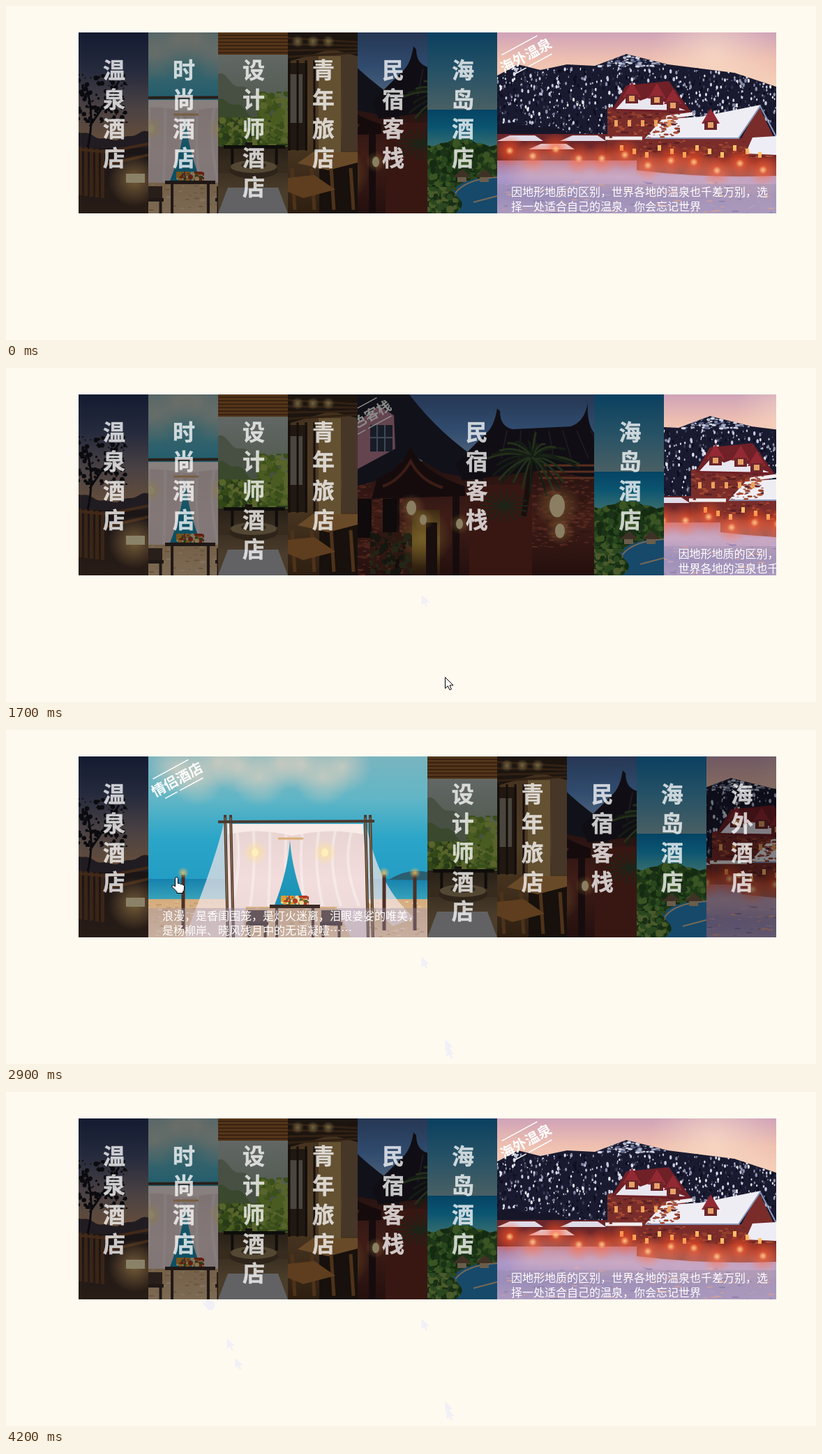
Write an HTML page with a canvas that moves like this. It is 1161 px wide and 480 px high and loops after 4700 ms.

```html
<!DOCTYPE html>
<html lang="zh-CN">
<head>
<meta charset="utf-8">
<title>Hotel accordion</title>
<style>
html, body { margin: 0; width: 100%; height: 100%; overflow: hidden; background: #fffaf0; }
body { font: 16px/21px "Noto Sans CJK SC", "Noto Sans CJK", sans-serif; color: #fff; text-spacing-trim: space-all; }
svg { position: absolute; left: 0; top: 0; width: 1161px; height: 480px; }
#menu { position: absolute; left: 104px; top: 38px; width: 1000px; height: 260px; display: flex; overflow: hidden; }
.panel { position: relative; flex: none; height: 260px; overflow: hidden; }
.panel > * { position: absolute; }
canvas { left: calc(50% - 200px); top: 0; }
.shade { inset: 0; background: rgba(0,0,0,.46); }
.shade b { position: absolute; left: calc(50% - 15px); top: 31px; width: 32px; font-size: 32px; line-height: 42px; color: rgba(255,255,255,.76); -webkit-text-stroke: .5px rgba(255,255,255,.6); }
.note { left: 0; top: 218px; height: 42px; width: 95%; padding-left: 20px; background: rgba(150,140,165,.38); }
.open .shade, .panel:not(.open) .note { display: none; }
</style>
</head>
<body>
<svg id="stains" fill="#f1f0f7"></svg>
<div id="menu"></div>
<svg><path id="cursor" fill="#fff" stroke="#000"/></svg>
<script>
let c, seed = 7;
const rnd = () => (seed = seed * 16807 % 2147483647) / 2147483647;
const repeat = (n, draw) => { for (let i = 0; i < n; i++) draw(i); };

// Drawing helpers, all on a 400 x 260 picture
const fade = (y0, y1, ...colors) => {
  const g = c.createLinearGradient(0, y0, 0, y1);
  colors.forEach((col, i) => g.addColorStop(i / (colors.length - 1), col));
  return g;
};
const rect = (fill, x, y, w, h) => { c.fillStyle = fill; c.fillRect(x, y, w, h); };
const shape = (fill, d) => { c.fillStyle = fill; c.fill(new Path2D(d)); };
const line = (color, width, d) => { c.strokeStyle = color; c.lineWidth = width; c.stroke(new Path2D(d)); };
const oval = (fill, x, y, rx, ry) => { c.fillStyle = fill; c.beginPath(); c.ellipse(x, y, rx, ry, 0, 0, 7); c.fill(); };
const glow = (rgb, x, y, r, alpha = .8) => {
  const g = c.createRadialGradient(x, y, 0, x, y, r);
  g.addColorStop(0, `rgba(${rgb},${alpha})`);
  g.addColorStop(1, `rgba(${rgb},0)`);
  rect(g, x - r, y - r, 2 * r, 2 * r);
};
// Outline of a hill range made of two waves
const range = (y, height, wave, shift = 0) => {
  let d = 'M0 260';
  for (let x = 0; x <= 400; x += 5)
    d += `L${x} ${y - height * (Math.sin(x / wave + shift) + .25 * Math.sin(x / wave * 4.3))}`;
  return d + 'V260Z';
};
const boxPath = (x, y, w, h) => `M${x} ${y}h${w}v${h}h${-w}Z`;
const texture = (n, size, colors, [x, y, w, h], clip = boxPath(x, y, w, h), flat = 1) => {
  c.save();
  c.clip(new Path2D(clip));
  repeat(n, i => {
    const s = size * (.4 + rnd());
    oval(colors[i % colors.length], x + rnd() * w, y + rnd() * h, s, s * flat);
  });
  c.restore();
};
const table = (color, x, y, w, h) => {
  rect(color, x, y, w, 5);
  line(color, 4, `M${x + w * .14} ${y}v${h}M${x + w * .86} ${y}v${h}`);
};
const stamp = text => {
  c.save();
  c.translate(41, 33);
  c.rotate(-.5);
  c.fillStyle = '#fff';
  c.font = '900 20px "Noto Sans CJK SC", "Noto Sans CJK", sans-serif';
  c.textAlign = 'center';
  c.textBaseline = 'middle';
  c.fillText(text, 0, 0);
  line('#fff', 1.5, 'M-30-17H28M-28 16H-8M-4 16H34');
  c.restore();
};

function hotSpring() {
  rect(fade(0, 165, '#25325a', '#454e70', '#8b7a7c', '#c39368'), 150, 0, 100, 260);
  shape('#3c343c', range(148, 6, 18));
  rect(fade(165, 260, '#312529', '#4a3428'), 150, 166, 100, 94);
  line('#15141c', 3, 'M162 170Q175 120 160 75M166 135Q190 100 208 70');
  texture(110, 2.5, ['#15141c'], [150, 60, 70, 70]);
  repeat(5, i => rect('#6b4429', 150 + i * 8, 164 + i, 5, 70));
  line('#7a4c2c', 4, 'M150 168 190 172 250 160M190 190 250 176');
  glow('255,200,120', 230, 212, 38);
  rect('#fff0c0', 218, 203, 27, 13);
}

function beach() {
  rect(fade(0, 178, '#79b4bf', '#62b6c6', '#2aa5c8', '#249dc4'), 0, 0, 400, 178);
  repeat(9, i => glow('246,214,190', 40 + i * 30, 18 + 14 * Math.sin(i * 2), 40, .55));
  rect(fade(176, 208, '#1681ae', '#3aa6bb'), 0, 176, 400, 32);
  shape('#2b5f70', 'M345 177Q372 160 400 166V178Z');
  rect(fade(205, 260, '#d3ab7e', '#e6c49a'), 0, 205, 400, 55);
  texture(200, 3, ['#c59c70', '#f0d4ae'], [0, 208, 400, 52], undefined, .3);
  shape('rgba(247,231,232,.7)', 'M108 96Q96 150 52 260H118V96ZM312 96Q330 190 382 232L350 244 306 200Z');
  shape(fade(96, 260, '#e7d3d2', '#f2dddc', '#e8d6d4'), 'M114 98H308L318 260H290L270 216H140L134 260H112Z');
  repeat(8, i => line('rgba(255,255,255,.35)', 4, `M${126 + i * 24} 100Q${135 + i * 20} 150 ${120 + i * 26} 215`));
  shape('#f8ebe8', 'M114 97H308V112Q260 102 206 114Q160 102 114 112Z');
  shape(fade(120, 216, '#33a3c2', '#1590b5'), 'M203 120Q206 165 226 216H180Q200 165 203 120Z');
  line('#dcae76', 3, 'M186 118H222');
  [153, 253].forEach(x => {
    glow('255,226,150', x, 138, 18);
    oval('#fff0bc', x, 138, 5, 6);
  });
  [110, 118, 311, 318].forEach(x => {
    line('#4b3a30', 4, `M${x} 84 ${x + 4} 260`);
    line('#a98258', 1, `M${x} 88 ${x + 4} 260`);
  });
  line('#4b3a30', 4, 'M100 94 324 93');
  table('#3b2c28', 174, 213, 72, 47);
  [142, 248].forEach(x => { rect('#4a3830', x, 221, 28, 17); table('#3b2c28', x - 2, 238, 32, 22); });
  texture(50, 3, ['#b23b22', '#e29a30', '#4b6a2a', '#f0d8a0'], [190, 200, 40, 13]);
  [50, 338, 382].forEach(x => { line('#4c2f26', 5, `M${x} 170V250`); glow('255,190,90', x, 167, 8); });
  stamp('情侣酒店');
}

function designer() {
  rect(fade(32, 160, '#b4beba', '#9aaa98', '#7a9458'), 150, 0, 100, 260);
  shape('#84947c', range(80, 18, 25, 2));
  shape('#6b8452', range(112, 14, 20));
  texture(260, 4, ['#87a83c', '#5d832c', '#a2b850', '#4a6a2c'], [150, 122, 100, 42]);
  texture(160, 4, ['#87a83c', '#6c9132', '#a2b850'], [206, 85, 44, 75]);
  rect('#9a6230', 150, 0, 100, 32);
  repeat(6, i => rect('#6b3f1d', 150, 3 + i * 5, 100, 2));
  rect(fade(164, 230, '#4a3a2a', '#8a7050'), 150, 164, 100, 96);
  table('#1c1814', 158, 162, 88, 28);
  rect('#665038', 150, 190, 100, 12);
  oval('#54432f', 201, 198, 35, 12);
  oval('#9a8460', 201, 193, 33, 9);
  oval('#605035', 201, 191, 18, 5);
  rect('#2d241d', 189, 158, 10, 9);
  shape('#b4b5b8', 'M164 223H236L250 260H150Z');
}

function hostel() {
  rect(fade(0, 260, '#785636', '#937046', '#55381f'), 150, 0, 100, 260);
  rect('#3d2c20', 150, 44, 28, 125);
  rect('#b9965c', 194, 34, 32, 138);
  rect('#80644a', 228, 30, 22, 140);
  shape('#33251c', 'M150 0H250V34L212 24 150 42Z');
  repeat(4, i => line('#5b3d23', 3, `M150 ${8 + i * 9} 250 ${14 + i * 5}`));
  repeat(3, i => glow('255,220,140', 164 + i * 22, 13, 9));
  rect('#8a8070', 153, 60, 18, 70);
  repeat(4, i => line('#241a14', 3, `M${152 + i * 12} 40V170`));
  rect('#2b1e16', 195, 187, 55, 73);
  shape('#c18849', 'M164 188 186 172H250V187L208 198Z');
  repeat(4, i => line('#8d5d30', 5, `M${156 + i * 28} 195 ${160 + i * 28} 255`));
  shape('#ad7338', 'M150 209 188 205 218 226 172 238 150 229Z');
}

function inn() {
  rect(fade(0, 100, '#45659a', '#5a8bcb', '#9bc0e8'), 0, 0, 400, 260);
  rect(fade(92, 260, '#3c1d1d', '#74342a', '#421d1a'), 0, 96, 400, 164);
  [[0, 115, 100, 145], [280, 95, 120, 125]].forEach(box => texture(350, 4, ['#873e2f', '#592820', '#98493a'], box, undefined, .35));
  shape('#20202e', 'M0 0H104Q150 60 210 98V124L150 112 104 84 70 120 0 140Z');
  shape('#b77d91', 'M4 60 60 16 82 30 84 78 10 118Z');
  rect('#2d3348', 48, 44, 32, 38);
  line('#7585a1', 2, 'M58 44v38M69 44v38M48 62h32');
  shape('#1e1a24', 'M170 100 214 56Q226 46 230 20L234 24Q234 46 252 50L335 46Q355 40 360 12Q358 44 371 58L400 86V128L300 108 180 124Z');
  repeat(7, i => line('#3d3541', 1.5, `M${244 + i * 20} 52l${i * 5 - 8} 40`));
  shape('#271518', 'M58 120Q92 108 106 74Q122 112 184 132V146L50 150Z');
  line('#6e3426', 4, 'M66 132Q90 124 106 96Q120 124 152 134');
  [80, 166].forEach(x => rect('#2a1718', x, 146, 10, 114));
  repeat(3, i => line('#a55537', 3, `M290 ${102 + i * 9}H400`));
  [30, 66].forEach(x => rect('#1b1215', x, 150, 20, 56));
  rect(fade(165, 260, '#6e4c24', '#a27b30', '#4a2c1a'), 108, 166, 40, 94);
  glow('255,210,90', 124, 205, 42, .6);
  rect('#2c1a18', 128, 184, 16, 76);
  rect('#682a22', 190, 130, 90, 130);
  line('#281c1a', 8, 'M280 90Q276 125 268 175');
  repeat(26, i => {
    const a = i * 2.4, r = 40 + rnd() * 30, x = 280 + Math.cos(a) * r, y = 100 + Math.sin(a) * r * .7;
    line(i % 2 ? '#263525' : '#41582f', 3, `M280 90Q${(280 + x) / 2} ${(90 + y) / 2 - 12} ${x} ${y}`);
  });
  repeat(18, i => line('#35432b', 2, `M240 160l${Math.cos(i * .35) * 34} ${Math.sin(i * .35) * 24}`));
  texture(120, 4, ['#27291c', '#404527', '#522b20'], [48, 198, 60, 60]);
  [[107, 163, 7], [124, 180, 5], [176, 186, 5], [316, 160, 11], [320, 196, 7]].forEach(([x, y, r]) => {
    glow('255,190,100', x, y, r * 3, .6);
    oval('#ffe9b5', x, y, r, r * 1.5);
  });
  stamp('特色客栈');
}

function island() {
  rect(fade(0, 111, '#1276b0', '#4696bb', '#86b0b8'), 150, 0, 100, 111);
  rect(fade(111, 162, '#0a7cb8', '#149cd0', '#5cc4cc'), 150, 111, 100, 60);
  const trees = range(158, 5, 14);
  shape('#376528', trees);
  texture(380, 4, ['#488233', '#254d20', '#6a9a42', '#315d2a'], [150, 150, 100, 110], trees);
  shape('#2a86c4', 'M184 230Q200 207 250 208V260H190Q212 246 184 230Z');
  line('#d8c29e', 2, 'M190 231Q204 211 250 208M216 244 250 235');
  [200, 232].forEach(x => { shape('#745b45', `M${x - 13} 208l13-12 13 12Z`); rect('#c3ac8a', x - 7, 208, 13, 7); });
  texture(110, 4, ['#50823a', '#2c5525', '#89a650'], [150, 222, 42, 38]);
}

function lodge() {
  rect(fade(0, 80, '#cfa3b8', '#efc0b0', '#f6d2ba'), 0, 0, 400, 260);
  glow('252,226,205', 310, 30, 90, .6);
  const hills = 'M0 62 30 46 62 54 100 46 140 48 185 31 245 46 340 58 400 78V190H0Z';
  shape('#191a30', hills);
  texture(1500, 1.3, ['#e4e5ef', '#8a8eaa', '#0d0f20', '#c5c9df', '#0d0f20', '#353850'], [0, 52, 400, 120], hills, 1.7);
  texture(160, 2.5, ['#9aa2bd', '#5a6286', '#d5d8e6'], [140, 31, 110, 18], hills, .5);
  shape('#171629', range(142, 10, 45, 1));
  rect('#6a262a', 0, 146, 170, 38);
  repeat(3, i => shape('#dfdbe8', `M${i * 45} ${156 + i % 2 * 12}l18-8h36l12 8Z`));
  rect('#792d2a', 158, 108, 112, 88);
  shape('#702027', 'M164 112 185 76 246 70 280 117Z');
  shape('#e9e6ef', 'M170 110 190 88 205 98 222 92 244 102 270 112Z');
  shape('#792c29', 'M205 152H350L375 106 400 158V206H205Z');
  shape('#efedf4', 'M212 152 236 125 292 121 378 104 346 151Z');
  line('#f2edf0', 5, 'M155 152H208M242 122 280 117');
  line('#8998ba', 2, 'M212 152H346L377 106 400 150');
  [[193, 84], [229, 86], [252, 94], [306, 122]].forEach(([x, y]) => {
    shape('#922933', `M${x - 13} ${y + 9}l13-22 13 22Z`);
    rect('#6b272b', x - 9, y + 5, 18, 13);
    rect('#e6a168', x - 4, y + 7, 8, 8);
  });
  shape('#eeedf5', 'M356 174 366 151 400 149V176Z');
  [[158, 114, 104, 38], [205, 155, 152, 50], [356, 177, 44, 28]].forEach(box =>
    texture(130, 3, ['#95412f', '#5a2024', '#aa4c35'], box, undefined, .4));
  repeat(12, i => {
    rect('#ffc16a', 176 + i * 18, 162 + i % 3 * 5, 5, 8);
    if (i < 5) rect('#eca15c', 168 + i * 19, 126, 5, 9);
  });
  rect(fade(180, 260, '#b06f88', '#ad98c8', '#9c8ec4', '#b8a2cc'), 0, 184, 400, 76);
  shape('#863029', 'M200 180H400V206Q300 210 200 198Z');
  repeat(12, i => {
    const x = 18 + i * 33, y = 170 + i * 2.4 + 7 * Math.sin(i * 2.3);
    glow('255,82,36', x, y, 24);
    glow('255,230,150', x, y, 6);
  });
  repeat(9, i => glow('250,196,186', 50 + i * 42, 198 + i * 3, 40, .4));
  texture(170, 4, ['#c8aacd', '#8c79ae', '#efab98'], [0, 214, 400, 46], undefined, .2);
  stamp('海外温泉');
}

const hotels = [
  ['温泉酒店', hotSpring, ''],
  ['时尚酒店', beach, '浪漫，是香闺围笼，是灯火迷离，泪眼婆娑的唯美，是杨柳岸、晓风残月中的无语凝噎……'],
  ['设计师酒店', designer, ''],
  ['青年旅店', hostel, ''],
  ['民宿客栈', inn, '在这里，你可以静静发呆，而不被人打扰；在这里，你能看见最美好的星星，能让你找到最深的感动'],
  ['海岛酒店', island, ''],
  ['海外酒店', lodge, '因地形地质的区别，世界各地的温泉也千差万别，选择一处适合自己的温泉，你会忘记世界']
];
const menu = document.getElementById('menu');
const panels = hotels.map(([title, draw, note]) => {
  const panel = document.createElement('div');
  panel.className = 'panel';
  panel.innerHTML = `<canvas width="400" height="260"></canvas><div class="shade"><b>${title}</b></div><div class="note">${note}</div>`;
  c = panel.firstChild.getContext('2d');
  draw();
  menu.append(panel);
  return panel;
});

const LOOP = 4700, STEP = 100, SLIDE = 300, LAST = 6;
const hovers = [{ panel: 4, enter: 933, leave: 1611 }, { panel: 1, enter: 2605, leave: 3350 }];

// Key points of the pointer: time, x, y
const keys = [
  [300, 1024, 84], [800, 500, 125], [1400, 500, 125], [1600, 595, 325], [1700, 629, 444], [1800, 631, 454],
  [1900, 603, 452], [2000, 488, 427], [2500, 237, 211], [2900, 237, 211], [3300, 281, 290], [3400, 316, 353],
  [3500, 328, 381], [3700, 328, 381], [3800, 725, 393], [4100, 1142, 174]
];
const pointerAt = t => {
  const next = keys.findIndex(k => k[0] > t);
  const [t1, x1, y1] = keys.at(next < 0 ? -1 : next), [t0, x0, y0] = keys.at(next < 0 ? -1 : Math.max(0, next - 1));
  const part = t1 > t0 ? (t - t0) / (t1 - t0) : 0;
  return [x0 + (x1 - x0) * part, y0 + (y1 - y0) * part];
};
const ARROW = 'M.5 .5V16.5L4.3 13 7 18.6 9.4 17.5 7 12H12Z';
const HAND = 'M5.5 2.5a2 2 0 0 1 4 0V9.5q3-.8 3.5 1q2.5-.6 3 1q2.5-.4 2.5 2V17q0 3-2 4.5V23.5H8V21.5Q5 18.5 1 14.5q-.5-2.5 1.5-2.5q1.5.3 3 2Z';
const place = (path, [x, y]) => {
  path.setAttribute('d', x > 104 && x < 1104 && y < 298 ? HAND : ARROW);
  path.setAttribute('transform', `translate(${x} ${y})`);
};

// Faint marks the pointer leaves on the page
const stains = [1600, 1700, 1800, 3300, 3400, 3500].map(time => {
  const path = document.createElementNS('http://www.w3.org/2000/svg', 'path');
  place(path, pointerAt(time));
  document.getElementById('stains').append(path);
  return { path, time };
});

const cursor = document.getElementById('cursor');
const swing = ms => .5 - Math.cos(Math.PI * Math.min(1, Math.max(0, ms / SLIDE))) / 2;

function render(t) {
  const hover = hovers.filter(h => t >= h.enter).pop() || hovers[0];
  const grown = 300 * (swing(t - hover.enter) - swing(t - hover.leave));
  const open = t >= hover.enter && t < hover.leave ? hover.panel : LAST;
  panels.forEach((panel, i) => {
    panel.style.width = (i === LAST ? 400 - grown : i === hover.panel ? 100 + grown : 100) + 'px';
    panel.classList.toggle('open', i === open);
  });
  cursor.style.display = t >= 300 && t < 4200 ? '' : 'none';
  place(cursor, pointerAt(t));
  stains.forEach(s => s.path.style.display = t > s.time ? '' : 'none');
}

function tick() {
  render(Math.floor(performance.now() % LOOP / STEP) * STEP);
  requestAnimationFrame(tick);
}
tick();
</script>
</body>
</html>
```
